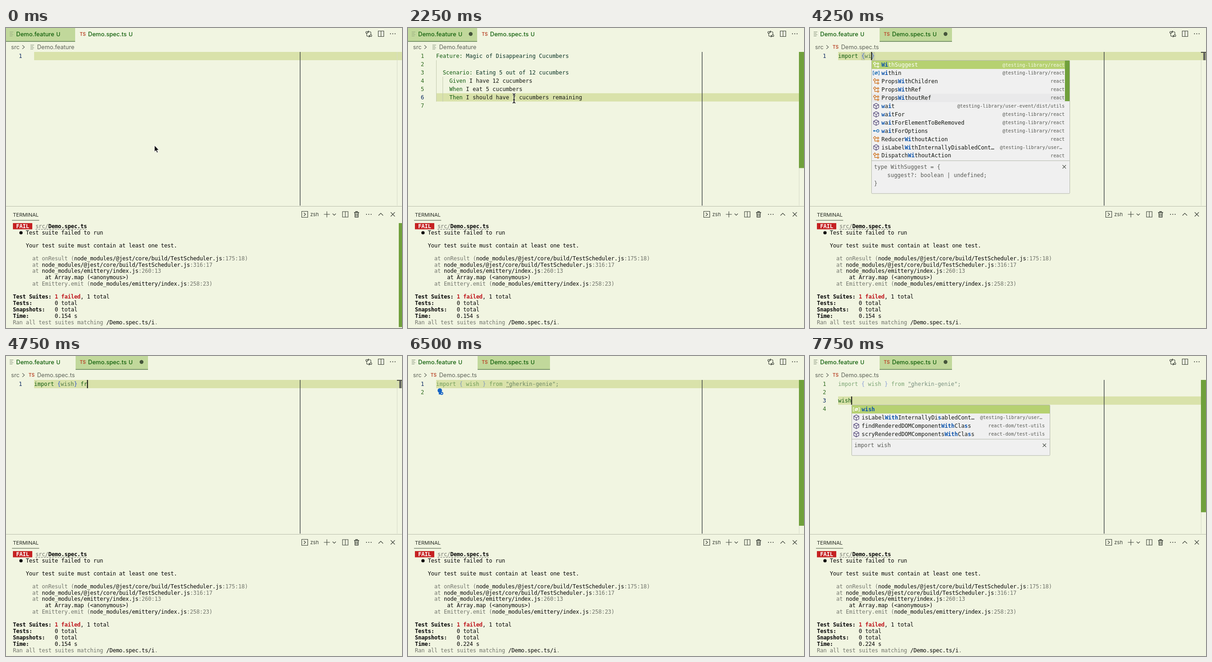
Animation of 859 by 652 pixels, one loop 8000 ms. Source, as an HTML page:

```html
<!DOCTYPE html>
<html lang="en">
<head>
<meta charset="utf-8">
<title>Editor demo</title>
<style>
html, body { margin: 0; width: 100%; height: 100%; overflow: hidden; background: #f1f5e1; }
svg { display: block; width: 859px; height: 652px; }
text { white-space: pre; }
.ui { font-family: Inter, "Open Sans", sans-serif; }
.code { font: 11.96px "DejaVu Sans Mono", monospace; fill: #141712; }
.term { letter-spacing: -.216px; fill: #050505; }
.side { font-size: 10.2px; fill: #575954; }
.k { fill: #125c10; }
.t { fill: #0c3527; }
.o { fill: #557c4c; }
.p { fill: #2b4fd0; }
.g { fill: #72756c; }
.b { font-weight: bold; }
.r { font-weight: bold; fill: #bf161c; }
.w { font-weight: bold; fill: #fff; }
.m { font-weight: bold; fill: #0a52ab; }
</style>
</head>
<body>
<svg id="stage" viewBox="0 0 859 652">
  <rect width="859" height="652" fill="#f1f5e1"/>
  <g id="view"></g>
</svg>
<script>
const LOOP = 8000, STEP = 250, COL = 7.2, ROW = 17.95, TOP = 52, LEFT = 61;
const INK = '#3b4038', GREEN = '#12600b', RED = '#96150f', BAR = '#70a03c';
const view = document.getElementById('view');

const esc = s => s.replace(/&/g, '&amp;').replace(/</g, '&lt;');
const rect = (x, y, w, h, fill, more = '') =>
  `<rect x="${x}" y="${y}" width="${w}" height="${h}" fill="${fill}" ${more}/>`;
const path = (d, color = INK, w = 1.1, more = '') =>
  `<path d="${d}" stroke="${color}" stroke-width="${w}" fill="none" ${more}/>`;
const dot = (x, y, r, fill) => `<circle cx="${x}" cy="${y}" r="${r}" fill="${fill}"/>`;
const at = (x, y, s) => `<g transform="translate(${x} ${y})">${s}</g>`;
const ui = (x, y, s, size, fill, weight = 400) =>
  `<text class="ui" x="${x}" y="${y}" font-size="${size}" font-weight="${weight}" fill="${fill}">${s}</text>`;

// parts alternate: class, text, class, text ...
function mono(x, y, parts, cls = '', more = '') {
  let s = '';
  for (let i = 0; i < parts.length; i += 2)
    s += `<tspan class="${parts[i]}">${esc(parts[i + 1])}</tspan>`;
  return `<text class="code ${cls}" x="${x}" y="${y}" ${more}>${s}</text>`;
}
// text between asterisks is a match
const marked = s => s.split('*').flatMap((p, i) => [i % 2 ? 'm' : '', p]);

const cross = (x, y, r = 4.5) => path(`M${x - r} ${y - r}l${2 * r} ${2 * r}m0 ${-2 * r}l${-2 * r} ${2 * r}`);
const dots = (x, y) => [-5, 0, 5].map(d => dot(x + d, y, 1.1, INK)).join('');
const split = (x, y) => at(x, y, path('M-6 -6H6V6H-6ZM0 -6V6'));
const fileIcon = (x, y, op) =>
  `<g opacity="${op}">${at(x, y, path('M0 0H8M0 3H6M0 6H8M0 9H6', '#6b7a62', 1))}</g>`;

function frame() {
  const git = path('M-4.5 -1.5V3Q-4.5 5 -2 5H2M0 3L2 5L0 7M4.5 1.5V-3Q4.5 -5 2 -5H-2M0 -7L-2 -5L0 -3') +
    path('M-6.5 -3.5a2 2 0 1 0 4 0a2 2 0 1 0 -4 0M2.5 3.5a2 2 0 1 0 4 0a2 2 0 1 0 -4 0');
  const trash = path('M-5.5 -4H5.5M-2 -4V-6H2V-4M-4 -4L-3.5 6H3.5L4 -4M-1.5 -2V4M1.5 -2V4', INK, 1.3);
  return at(787, 13, git) + split(813.5, 12.5) + dots(839, 12.5) +
    rect(0, 387, 859, 1, '#b9bdab') +
    ui(15, 409.5, 'TERMINAL', 11, '#262b23') + rect(13, 417.5, 59, 1, '#44543f') +
    at(648, 405, path('M-6.5 -6.5H6.5V6.5H-6.5ZM-2 -3.5L2 0L-2 3.5')) +
    ui(660, 409, 'zsh', 11, INK) +
    path('M689.5 405H702.5M696 398.5V411.5') + path('M708.5 403.5L712 407L715.5 403.5') +
    split(736, 405) + at(760.5, 405, trash) + dots(787, 405) +
    path('M808 407.5L813 402.5L818 407.5') + cross(839, 405);
}

function terminal(time) {
  const js = 'node_modules/@jest/core/build/TestScheduler.js', em = 'node_modules/emittery/index.js';
  const rows = [
    [0, 0, ['w', ' FAIL ', '', ' ', 'g', 'src/', 'b', 'Demo.spec.ts']],
    [1, 4, ['', 'Test suite failed to run']],
    [3, 4, ['', 'Your test suite must contain at least one test.']],
    [5, 6, ['g', 'at onResult (', '', js, 'g', ':175:18)']],
    [6, 6, ['g', 'at ', '', js, 'g', ':316:17']],
    [7, 6, ['g', 'at ', '', em, 'g', ':260:13']],
    [8, 10, ['', 'at Array.map (<anonymous>)']],
    [9, 6, ['g', 'at Emittery.emit (', '', em, 'g', ':258:23)']],
    [11, 0, ['b', 'Test Suites: ', 'r', '1 failed', '', ', 1 total']],
    [12, 0, ['b', 'Tests:       ', '', '0 total']],
    [13, 0, ['b', 'Snapshots:   ', '', '0 total']],
    [14, 0, ['b', 'Time:        ', '', time + ' s']],
    [15, 0, ['g', 'Ran all test suites matching ', '', '/Demo.spec.ts/i', 'g', '.']]
  ];
  return rect(15, 424, 42, 13.5, '#c52222') + dot(32.5, 445, 3.6, '#111') +
    path('M64 437.5H175', '#777', 1, 'stroke-dasharray="4 2"') +
    rows.map(([r, c, parts]) => mono(15 + 6.985 * c, 434.7 + 13.97 * r, parts, 'term')).join('');
}

function tabs(s) {
  const feat = s.file === 'feature', bg = s.hover ? '#d6e8bc' : '#c1d89b';
  const w = feat ? 150 : s.err ? 169 : 157, x = feat ? 0 : 151, color = s.err ? RED : GREEN;
  const ts = (px, y) => ui(px, y, 'TS', 10, '#b9472b', 600);
  let out = rect(x, 0, w, 29.5, bg) + rect(x, 28.6, w, 1.2, '#4d6b45') +
    fileIcon(8, 8.5, feat ? .45 : .8) +
    ui(22, 17.5, 'Demo.feature', 12.7, GREEN, 500) + ui(109, 17.5, 'U', 12, GREEN, 500) +
    ts(160, 16.5) + ui(178, 17.5, 'Demo.spec.ts', 12.7, color, 500) +
    ui(266, 17.5, s.err ? '1, U' : 'U', 12, color, 500);
  const mx = feat ? 136 : s.err ? 306 : 294;
  if (s.dirty) out += dot(mx, 13, 4.2, '#46553c');
  else if (s.hover) out += cross(mx, 13);
  out += ui(11, 45.5, 'src', 12.6, '#5c6157') + path('M35.5 37.5L40 41.5L35.5 45.5', '#5c6157');
  out += feat ? fileIcon(53, 37, .8) : ts(49, 45);
  return out + ui(67.5, 45.5, feat ? 'Demo.feature' : 'Demo.spec.ts', 12.6, '#5c6157');
}

const story = [
  ['k', 'Feature:', 't', ' Magic of Disappearing Cucumbers'],
  [],
  ['k', '  Scenario:', 't', ' Eating 5 out of 12 cucumbers'],
  ['k', '    Given', '', ' I have 12 cucumbers'],
  ['k', '    When', '', ' I eat 5 cucumbers'],
  ['k', '    Then', '', ' I should have 7 cucumbers remaining'],
  []
];
const faded = ['k', 'import ', 'p', '{ ', 'k', 'wish', 'p', ' } ', 'k', 'from ', 't', '"gherkin-genie";'];
const raw = (name, tail = '', str = '') =>
  ['k', 'import ', 'p', '{', 'o', name, 'p', '}', 'k', tail, 't', str];

function editor(s) {
  const n = s.lines.length, y = TOP + ROW * (s.row - 1);
  let out = rect(LEFT, y, 798, ROW, '#d9e2aa');
  if (s.file === 'feature' && n > 1)
    out += rect(61, 70, 1, 90, '#c3cbb0') + rect(75, 106, 1, 54, '#c3cbb0');
  s.lines.forEach((line, i) => {
    const base = TOP + ROW * i + 13, on = i + 1 === s.row;
    out += mono(35, base, ['', String(i + 1)], '', `text-anchor="end" style="fill:${on ? '#0c2a63' : '#2f6b20'}"`);
    out += mono(LEFT, base, line, '', s.fade && i === 0 ? 'opacity=".52"' : '');
  });
  if (s.box) out += [7, 10].map(c =>
    rect(LEFT + COL * c + .5, 53, 6.5, 16, 'none', 'stroke="#a9ad98" stroke-width=".8"')).join('');
  if (s.squiggle) {
    let d = 'M198 68';
    for (let i = 0; i < s.squiggle * 2; i++) d += `l${COL / 2} ${i % 2 ? 2 : -2}`;
    out += path(d, '#d0281f');
  }
  if (s.hint) out += [214, 217.5, 221].map(x => rect(x, 66.5, 1.4, 1.4, '#333')).join('');
  out += rect(637.4, TOP, 1.3, 334, '#30363a') + rect(848, TOP, 1, 334, '#d6dac8');
  if (s.bar) out += rect(848, TOP, 11, 334 * 334 / (316 + 18 * n), BAR);
  if (s.mark) {
    const red = s.mark === 'red';
    out += rect(848, TOP, 11, 1.6, '#222') +
      rect(red ? 857 : 853, 54, red ? 2 : 5, 16, red ? '#d8412f' : '#666962');
  }
  if (s.caret != null) out += rect(LEFT + COL * s.caret - .5, y, 2, ROW, '#111');
  if (s.bulb) out += at(s.bulb[0], s.bulb[1],
    dot(-1, -2.5, 4.8, '#1463c4') + rect(-3.2, 2, 4.4, 4, '#1463c4') +
    dot(3.2, 3.8, 3.2, '#1463c4') + dot(3.2, 3.8, 1.4, '#dfeaf2'));
  return out;
}

const icons = {
  type: c => path('M-6 -3L-3 -6L0 -3L-3 0ZM-3 0V4H2M0 -2.5H2M2 -2.5L4 -4.5L6 -2.5L4 -.5ZM2 4L4 2L6 4L4 6Z', c || '#cc6a10', 1.2),
  val: c => path('M-4.5 -4H-6.5V4H-4.5M4.5 -4H6.5V4H4.5M-3 0a3 2.4 0 1 0 6 0a3 2.4 0 1 0 -6 0M-3 3L3 -3', c || '#1b6fb5', 1.2),
  fn: c => path('M0 -6L5.5 -3V3L0 6L-5.5 3V-3ZM-5.5 -3L0 0L5.5 -3M0 0V6', c || '#4b3f72', 1.1),
  face: c => path('M-3 0H1M1 0a2.6 2.6 0 1 0 5.2 0a2.6 2.6 0 1 0 -5.2 0', c || '#1b6fb5', 1.3) + dot(-4.5, 0, 1.8, c || '#1b6fb5'),
  mod: c => path('M-2 -5H-3Q-4 -5 -4 -3.5V-1.5L-5.5 0L-4 1.5V3.5Q-4 5 -3 5H-2M2 -5H3Q4 -5 4 -3.5V-1.5L5.5 0L4 1.5V3.5Q4 5 3 5H2', c || '#44483f', 1.1)
};
const RTL = '@testing-library/react', USER = '@testing-library/user…';
const popups = {
  wi: {
    x: 133, y: 70, bar: 88, hover: 4,
    items: [
      ['type', '*Wi*thSuggest', RTL], ['val', '*wi*thin', RTL],
      ['type', 'Props*Wi*thChildren', 'react'], ['type', 'Props*Wi*thRef', 'react'],
      ['type', 'Props*Wi*thoutRef', 'react'],
      ['fn', '*w*a*i*t', '@testing-library/user-event/dist/utils'],
      ['fn', '*w*a*i*tFor', RTL], ['fn', '*w*a*i*tForElementToBeRemoved', RTL],
      ['face', '*w*a*i*tForOptions', RTL], ['type', 'Reducer*Wi*thoutAction', 'react'],
      ['fn', 'isLabel*Wi*thInternallyDisabledCont…', USER],
      ['type', 'Dispatch*Wi*thoutAction', 'react']
    ],
    info: ['type WithSuggest = {', '    suggest?: boolean | undefined;', '}']
  },
  g: {
    x: 213, y: 70,
    items: [['mod', '*g*herkin-genie', ''], ['mod', '*g*raceful-fs', ''], ['mod', '@babel/*g*enerator', '']]
  },
  wish: {
    x: 90, y: 106,
    items: [
      ['val', '*wish*', ''], ['fn', 'isLabel*With*InternallyDi*s*abledCont…', USER],
      ['fn', 'findRenderedDOMComponent*With*Cla*s*s', 'react-dom/test-utils'],
      ['fn', 'scryRenderedDOMComponents*With*Cla*s*s', 'react-dom/test-utils']
    ],
    info: ['import wish']
  }
};

function popup({ x, y, items, info, bar, hover }) {
  const list = ROW * items.length + 2.5, more = info ? ROW * info.length + 17.5 : 0;
  let out = rect(x + .5, y + .5, 430, list + more, '#f0f0f0', 'stroke="#b4b8ac" rx="1.5"') +
    rect(x + 1, y + 1, 429, ROW, '#b6d171');
  if (hover) out += rect(x + 1, y + 1 + ROW * hover, 429, ROW, '#e9e9ea');
  items.forEach(([kind, label, from], i) => {
    const top = y + 1 + ROW * i, cut = from.endsWith('…');
    out += at(x + 10.5, top + 9, icons[kind](i ? '' : '#fff'));
    out += mono(x + 22, top + 13, marked(label), '', i ? '' : 'style="fill:#fff"');
    out += mono(cut ? x + 279 : x + 419.5, top + 12.5, ['', from], 'side',
      (cut ? '' : 'text-anchor="end"') + (i ? '' : ' style="fill:#f4f8e8"'));
  });
  if (bar) out += rect(x + 420, y + 1, 10, bar, BAR);
  if (info) {
    const sep = y + list;
    out += rect(x + .5, sep, 430, 1, '#b4b8ac') + cross(x + 418.5, sep + 13.7, 3.7);
    info.forEach((s, i) => out += mono(x + 6, sep + 17.7 + ROW * i, ['', s], '', 'style="fill:#575954"'));
  }
  return out;
}

const ibeam = 'M-3 -10Q0 -10 0 -7V7Q0 10 -3 10M3 -10Q0 -10 0 -7M0 7Q0 10 3 10M-2 3H2';
const pointers = {
  arrow: '<path d="M0 0V14.2L3.2 11.2L5.4 16.2L7.8 15.2L5.6 10.4H9.8Z" fill="#111" stroke="#fff"/>',
  beam: path(ibeam, '#fff', 3) + path(ibeam, '#111', 1.6),
  hand: '<path d="M-3 -8Q-1 -9.5 -.5 -7L.5 -2Q2 -3.5 3 -1.8Q5 -2.8 5.6 -1Q7.5 -1.6 7.8 .8L7.5 5L6 9H-1.5L-5.5 3.5Q-7.5 .8 -5.8 .2Q-4.5 0 -2.5 2L-4 -6Q-4 -7.5 -3 -8Z" fill="#fff" stroke="#111" stroke-width="1.4"/>' +
    path('M1 3.5V7M3 3.5V7M5 3.5V7', '#111', 1)
};
// time, x, y
const trail = [[0, 322, 255], [250, 300, 236], [1000, 185, 117], [1250, 185, 117], [1750, 172, 135],
  [2250, 230, 153], [2500, 231, 140], [3000, 225, 22], [3250, 225, 22]];

function pointer(t) {
  if (t > 3250) return '';
  const i = Math.max(1, trail.findIndex(p => p[0] >= t));
  const a = trail[i - 1], b = trail[i], u = (t - a[0]) / (b[0] - a[0]);
  const mix = j => a[j] + (b[j] - a[j]) * u;
  return at(mix(1), mix(2), pointers[t < 500 ? 'arrow' : t < 3000 ? 'beam' : 'hand']);
}

// each entry changes the state from its time on
const script = [
  [0, { file: 'feature', lines: [[]], row: 1, time: '0.154', termBar: true }],
  [250, { termBar: false, caret: 0 }],
  [500, { lines: story, row: 7, dirty: true, bar: true }],
  [1000, { row: 4, caret: null }],
  [1500, { row: 5 }],
  [2000, { row: 6 }],
  [2500, { dirty: false }],
  [3000, { file: 'spec', lines: [[]], row: 1, bar: false, hover: true, caret: 0 }],
  [3500, { hover: false, dirty: true, lines: [['k', 'im']], caret: 2, mark: 'gray' }],
  [3750, { lines: [['k', 'import']], caret: 6 }],
  [4000, { lines: [raw('')], caret: 8 }],
  [4250, { lines: [raw('wi')], caret: 10, box: true, pop: 'wi' }],
  [4500, { lines: [raw('wish')], caret: 12, box: false, pop: null }],
  [4750, { lines: [raw('wish', ' fr')], caret: 16 }],
  [5000, { lines: [raw('wish', ' from ')], caret: 19 }],
  [5250, { lines: [raw('wish', ' from ', "''")], caret: 20, err: true, mark: 'red', fade: true, squiggle: 2 }],
  [5500, { lines: [raw('wish', ' from ', "'g'")], caret: null, squiggle: 3, bulb: [229, 60], pop: 'g' }],
  [5750, { lines: [raw('wish', ' from ', "'gherkin-genie'")], caret: 33, squiggle: 0, bulb: null, pop: null }],
  [6000, { err: false, mark: null, caret: 34 }],
  [6250, { lines: [faded, []], dirty: false, hint: true, bar: true, caret: null }],
  [6500, { time: '0.224', bulb: [70, 77.5] }],
  [6750, { lines: [faded, [], []], row: 2, bulb: null, dirty: true, caret: 0 }],
  [7000, { lines: [faded, [], [], []], row: 3 }],
  [7250, { lines: [faded, [], ['k', 'w'], []], caret: 1 }],
  [7500, { lines: [faded, [], ['k', 'wis'], []], caret: 3, pop: 'wish' }],
  [7750, { lines: [faded, [], ['k', 'wish'], []], caret: 4 }]
];

function render(t) {
  const s = Object.assign({}, ...script.filter(e => e[0] <= t).map(e => e[1]));
  view.innerHTML = tabs(s) + editor(s) + frame() + terminal(s.time) +
    (s.termBar ? rect(852, 424, 7, 226, BAR) : '') +
    (s.pop ? popup(popups[s.pop]) : '') + pointer(t);
}

let last = -1;
const start = performance.now();
function tick() {
  const t = Math.floor(((performance.now() - start) % LOOP) / STEP) * STEP;
  if (t !== last) render(last = t);
  requestAnimationFrame(tick);
}
tick();
</script>
</body>
</html>
```
